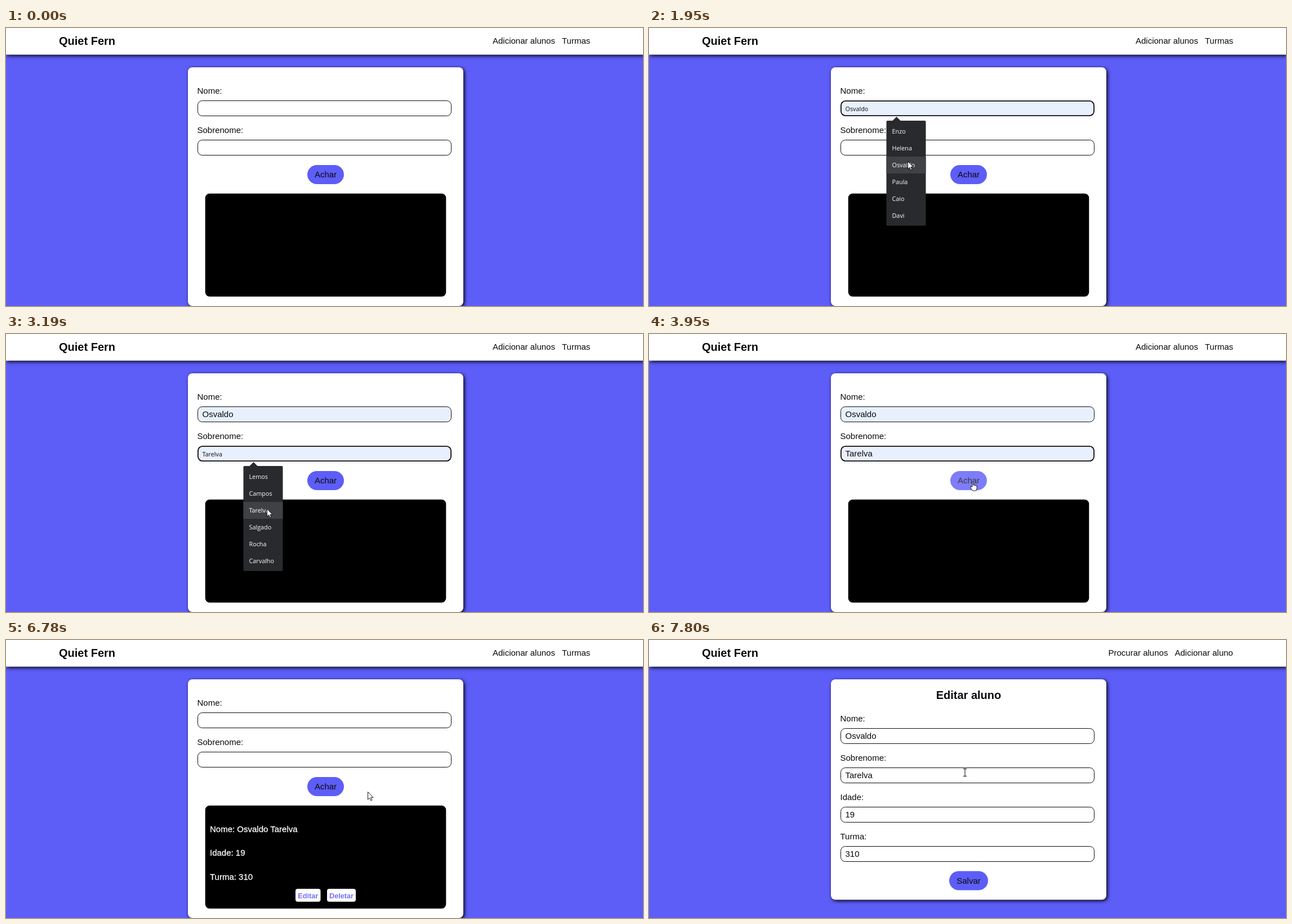
An HTML page for the animation above (8 s loop, 1131 by 495 pixels).

```html
<!DOCTYPE html>
<html lang="pt">
<head>
<meta charset="utf-8">
<title>Alunos</title>
<style>
  html, body { margin: 0; width: 100%; height: 100%; overflow: hidden; background: #5d5df8; }
  svg { display: block; width: 1131px; height: 495px; }
  text { font: 15px "Liberation Sans", Arial, sans-serif; fill: #0a0a0a; white-space: pre; }
  .title { font-size: 20px; font-weight: bold; }
  .small { font: 10.8px "Open Sans", "Noto Sans", sans-serif; }
  .light { fill: #fff; }
  .result { fill: #fff; stroke: #fff; stroke-width: .3px; }
  .action { font-size: 12.7px; font-weight: bold; fill: #7271f7; }
  .mid { text-anchor: middle; }
  .raised { fill: #fff; filter: drop-shadow(2px 2px 3px #000); }
</style>
</head>
<body>
<svg id="stage" viewBox="0 0 1131 495"></svg>
<script>
const LOOP = 8000, STEP = 70;
const BLUE = '#5d5df8', AUTOFILL = '#e8f0fe', DARK = '#292a2d';
const FIRST = 'Osvaldo', LAST = 'Tarelva';
const ROW = 70, ITEM = 30;

const FOCUS_FIRST = 910, FOCUS_LAST = 2310, FIND = 4210, FOUND = 4280, LEAVE = 6920, ARRIVE = 6980;
const MENUS = [
  { open: 980, pick: 2030, items: ['Enzo', 'Helena', FIRST, 'Paula', 'Caio', 'Davi'] },
  { open: 2450, pick: 3600, items: ['Lemos', 'Campos', LAST, 'Salgado', 'Rocha', 'Carvalho'] }
].map((menu, i) => ({ ...menu, y: 165 + ROW * i }));

// Where the pointer goes, each move easing on from the last
const ENTRY = { x: 1110, y: 520 };
const MOVES = [
  { from: 70, to: 580, x: 540, y: 132 },
  { from: 770, to: 770, x: 540, y: 143 },
  { from: 1050, to: 1680, x: 456, y: 233 },
  { from: 1750, to: 1890, x: 459, y: 237 },
  { from: 2030, to: 2350, x: 470, y: 213 },
  { from: 2560, to: 3190, x: 463, y: 311 },
  { from: 3390, to: 3460, x: 462, y: 317 },
  { from: 3600, to: 3950, x: 575, y: 263 },
  { from: 4670, to: 4880, x: 590, y: 323 },
  { from: 4950, to: 5090, x: 545, y: 427 },
  { from: 5280, to: 5890, x: 534, y: 449 },
  { from: 6110, to: 6740, x: 642, y: 270 },
  { from: 7170, to: 7310, x: 649, y: 261 },
  { from: 7590, to: 7800, x: 561, y: 236 }
];

const between = (t, from, to) => t >= from && t < to;
const inside = (p, x, y, w, h) => p && between(p.x, x, x + w) && between(p.y, y, y + h);
const overField = (p, y) => inside(p, 340, y, 451, 28);
const easeOut = p => Math.sin(Math.min(1, p) * Math.PI / 2);

const rect = (x, y, w, h, r, fill, more = '') =>
  `<rect x="${x}" y="${y}" width="${w}" height="${h}" rx="${r}" fill="${fill}" ${more}/>`;
const text = (x, y, value, style = '') => `<text x="${x}" y="${y}" class="${style}">${value}</text>`;

function pointerAt(t) {
  const i = MOVES.filter(move => t >= move.from).length - 1;
  if (i < 0) return null;
  const move = MOVES[i], start = MOVES[i - 1] || ENTRY;
  const steps = Math.floor((t - move.from) / STEP) + 1;
  const done = easeOut(steps * STEP / (move.to - move.from + STEP));
  const mix = axis => Math.round(start[axis] + (move[axis] - start[axis]) * done);
  return { x: mix('x'), y: mix('y') };
}

const POINTERS = {
  arrow: '<path d="M.5 .5V14L3.6 11.2 5.8 16 7.9 15.1 5.8 10.4H10Z" fill="#fff" stroke="#000" stroke-width=".9"/>',
  beam: '<path d="M-3 -6.5H3M0 -6V6M-3 6.5H3" fill="none" stroke="#000"/>',
  hand: '<path d="M-1 9V1.2Q0 -.5 1 1.2V6L7 7Q8 12 6 16H-.5L-4 11Q-4.5 8.4-2.6 8.7Z" fill="#fff" stroke="#000" stroke-width=".9"/>'
};
const pointer = (p, kind) => p ? `<g transform="translate(${p.x} ${p.y})">${POINTERS[kind]}</g>` : '';

const header = (x1, label1, x2, label2) =>
  '<rect class="raised" x="0" y="-10" width="1131" height="57.5"/>' +
  text(94, 30, 'Quiet Fern', 'title') + text(x1, 28, label1) + text(x2, 28, label2);

const card = height => `<rect class="raised" x="323" y="70" width="489" height="${height}" rx="8"/>`;

function field(y, label, value = '', { focused, preview, filled } = {}) {
  const line = focused ? 1.8 : 1;
  return text(339.5, y - 12, label) +
    rect(340 + line / 2, y + line / 2, 451 - line, 28 - line, 8, filled ? AUTOFILL : '#fff',
      `stroke="#0c0c0c" stroke-width="${line}"`) +
    text(348.5, y + 19, value, preview ? 'small' : '');
}

const button = (x, y, w, h, r, fill, label, style, hovered) =>
  `<g opacity="${hovered ? .8 : 1}">${rect(x, y, w, h, r, fill)}` +
  `${text(x + w / 2, y + h / 2 + 5, label, 'mid ' + style)}</g>`;
const pill = (x, y, w, label, hovered) => button(x, y, w, 34, 17, BLUE, label, '', hovered);
const action = (x, w, label, hovered) => button(x, 443, w, 23, 4, '#fff', label, 'action', hovered);

function menuView({ y, items }, row) {
  return `<path d="M432 ${y + .5}l7.5 -7.5 7.5 7.5Z" fill="${DARK}"/>` +
    rect(421.5, y, 70, 187, 2, DARK) +
    (items[row] ? rect(421.5, y + 4 + row * ITEM, 70, ITEM, 0, '#404144') : '') +
    items.map((item, i) => text(431.5, y + 23 + i * ITEM, item, 'small light')).join('');
}

function searchPage(t, p) {
  const menu = MENUS.find(m => between(t, m.open, m.pick));
  const inMenu = menu && inside(p, 421, menu.y, 70, 187);
  const row = inMenu ? Math.floor((p.y - menu.y - 4) / ITEM) : -1;
  const focus = [between(t, FOCUS_FIRST, FOCUS_LAST), between(t, FOCUS_LAST, FIND)];
  const found = t >= FOUND;
  const overFind = !inMenu && inside(p, 535, 244, 65, 34);
  const overEdit = found && inside(p, 514, 443, 44, 23);
  const typing = !inMenu && (overField(p, 129) || overField(p, 129 + ROW));

  const fields = ['Nome:', 'Sobrenome:'].map((label, i) => {
    const picked = between(t, MENUS[i].pick, FOUND);
    const preview = menu === MENUS[i] && menu.items[row];
    const value = picked ? [FIRST, LAST][i] : preview || '';
    return field(129 + ROW * i, label, value, { focused: focus[i], preview, filled: value });
  });

  const results = [`Nome: ${FIRST} ${LAST}`, 'Idade: 19', 'Turma: 310']
    .map((line, i) => text(362, 341.5 + 42.5 * i, line, 'result')).join('') +
    action(514, 44.5, 'Editar', overEdit) + action(570, 51, 'Deletar', false);

  return header(864, 'Adicionar alunos', 987, 'Turmas') + card(425) + fields.join('') +
    pill(535, 244, 65, 'Achar', overFind) + rect(353.7, 294.7, 427.6, 183.6, 8, '#000') +
    (found ? results : '') + (menu ? menuView(menu, row) : '') +
    pointer(p, typing ? 'beam' : overFind || overEdit ? 'hand' : 'arrow');
}

function editPage(p) {
  const rows = Object.entries({ 'Nome:': FIRST, 'Sobrenome:': LAST, 'Idade:': '19', 'Turma:': '310' })
    .map(([label, value], i) => ({ label, value, y: 157 + ROW * i }));
  const typing = rows.some(({ y }) => overField(p, y));
  return header(815.5, 'Procurar alunos', 933.5, 'Adicionar aluno') + card(392.5) +
    text(567.5, 105, 'Editar aluno', 'title mid') +
    rows.map(({ label, value, y }) => field(y, label, value)).join('') +
    pill(533, 411.5, 69, 'Salvar', false) +
    pointer(p, typing ? 'beam' : 'arrow');
}

const stage = document.getElementById('stage');
let drawn = '';

function render(t) {
  const p = pointerAt(t);
  const page = t < LEAVE ? searchPage(t, p) : t < ARRIVE ? pointer(p, 'arrow') : editPage(p);
  const view = rect(0, 0, 1131, 495, 0, BLUE) + page;
  if (view !== drawn) stage.innerHTML = drawn = view;
}

function tick() {
  render(performance.now() % LOOP);
  requestAnimationFrame(tick);
}
tick();
</script>
</body>
</html>
```
